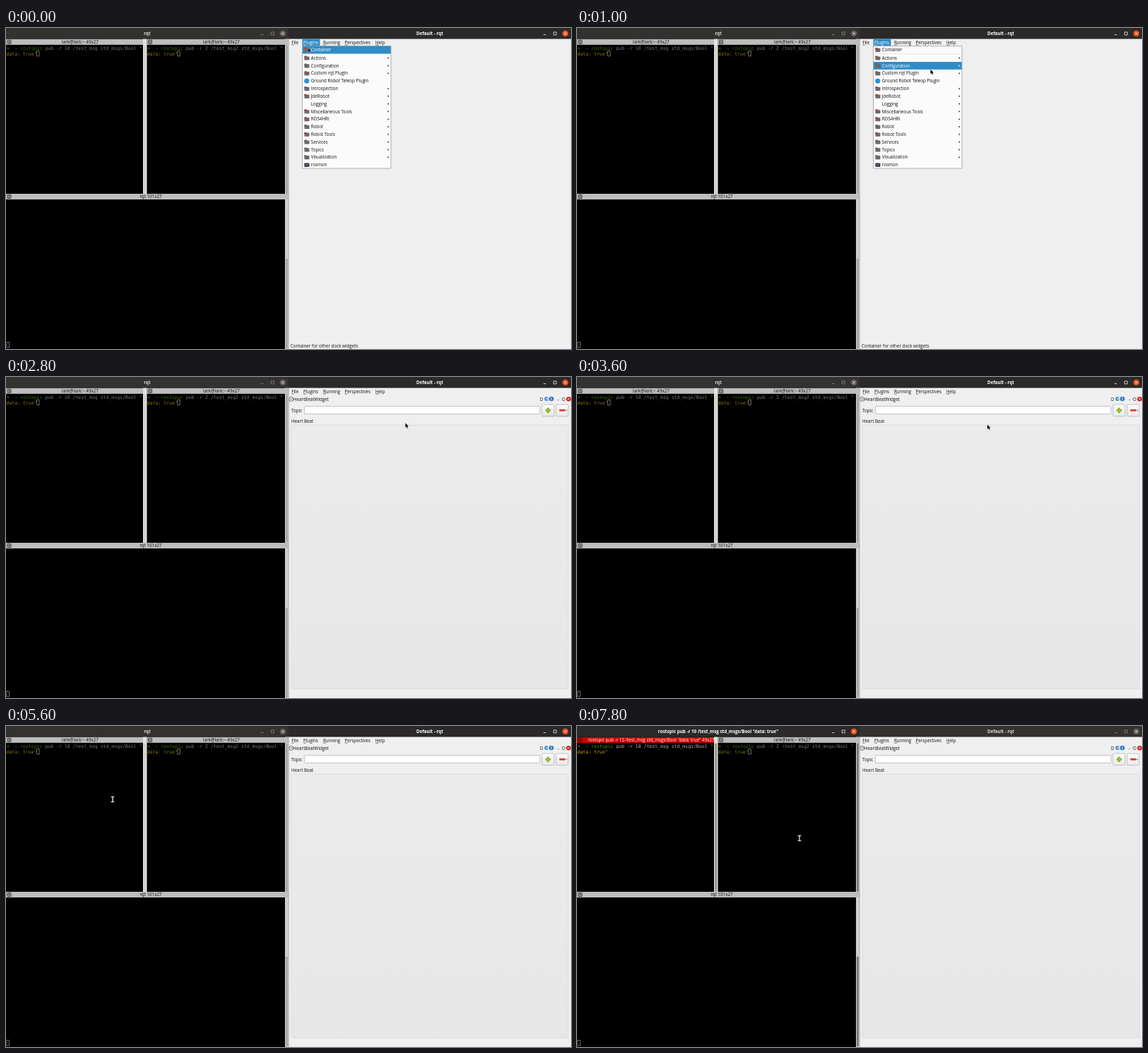
Animation of 800 by 455 pixels, one loop 8 s. Source, as an HTML page with a canvas:

```html
<!DOCTYPE html>
<html lang="en">
<head>
<meta charset="utf-8">
<title>rqt plugin demo</title>
<style>
  html, body { margin: 0; width: 100%; height: 100%; overflow: hidden; background: #000; }
  canvas { display: block; width: 800px; height: 455px; }
</style>
</head>
<body>
<canvas id="stage" width="800" height="455"></canvas>
<script>
const ctx = document.getElementById('stage').getContext('2d');
const LOOP = 8000, STEP = 200;
const MENU_CLOSE = 2600, WIDGET_OPEN = 2800, FOCUS = 5800, RUN = 6800;
const SANS = '6.25px "Open Sans", "Noto Sans", sans-serif';
const MONO = '6.5px "DejaVu Sans Mono", monospace';
const CELL = 3.92, BLUE = '#308cc6', ORANGE = '#e95420';
const HOST = 'lark@lark:~';
const COMMANDS = ['-r 10 /test_msg', '-r 2 /test_msg2'];

// time, x, y of the pointer
const POINTER = [[0, 427.5, 28], [200, 432, 30], [1000, 500.5, 58.7], [1200, 503, 60.5],
  [2000, 549.5, 62.5], [2400, 550, 63], [3200, 581, 67.5], [3800, 581, 67.5], [5200, 151, 104],
  [6400, 151, 104], [7200, 151, 104], [7800, 315, 159]];

// label, icon: f folder, r folder with red, b blue disc, m monitor
const ITEMS = [['Container', 'r'], ['Actions', 'r'], ['Configuration', 'f'], ['Custom rqt Plugin', 'r'],
  ['Ground Robot Teleop Plugin', 'b'], ['Introspection', 'f'], ['JdeRobot', 'r'], ['Logging', ''],
  ['Miscellaneous Tools', 'r'], ['ROS4HRI', 'r'], ['Robot', 'f'], ['Robot Tools', 'r'],
  ['Services', 'f'], ['Topics', 'f'], ['Visualization', 'f'], ['rosmon', 'm']];
const CUSTOM = 3;

function rect(x, y, w, h, fill) {
  ctx.fillStyle = fill;
  ctx.fillRect(x, y, w, h);
}

function box(x, y, w, h, fill, stroke, radius = 0) {
  ctx.beginPath();
  ctx.roundRect(x, y, w, h, radius);
  if (fill) { ctx.fillStyle = fill; ctx.fill(); }
  if (stroke) { ctx.strokeStyle = stroke; ctx.lineWidth = 0.8; ctx.stroke(); }
}

function disc(x, y, r, fill, stroke) {
  box(x - r, y - r, 2 * r, 2 * r, fill, stroke, r);
}

function lines(points, color, width = 0.8) {
  ctx.beginPath();
  for (const [x1, y1, x2, y2] of points) { ctx.moveTo(x1, y1); ctx.lineTo(x2, y2); }
  ctx.strokeStyle = color;
  ctx.lineWidth = width;
  ctx.stroke();
}

function polygon(points, fill, stroke) {
  ctx.beginPath();
  points.forEach(([x, y]) => ctx.lineTo(x, y));
  ctx.closePath();
  if (stroke) { ctx.strokeStyle = stroke; ctx.lineWidth = 1; ctx.stroke(); }
  ctx.fillStyle = fill;
  ctx.fill();
}

// y is the middle of the capitals
function text(str, x, y, color = '#111', { align = 'left', font = SANS } = {}) {
  ctx.font = font;
  ctx.textAlign = align;
  ctx.fillStyle = color;
  ctx.fillText(str, x, y + 2.2);
}

function cross(x, y, r, color) {
  lines([[x - r, y - r, x + r, y + r], [x + r, y - r, x - r, y + r]], color);
}

function titleBar(x, title, active) {
  const ink = active ? '#f2f2f2' : '#8b8986';
  rect(x, 0, 400, 15.5, active ? '#2b2929' : '#343231');
  text(title, x + 200, 8, active ? '#fff' : '#dcdad7', { align: 'center', font: 'bold ' + SANS });
  lines([[x + 361, 9.5, x + 364.5, 9.5]], ink);
  box(x + 375.3, 5.8, 4, 4, null, ink);
  disc(x + 392, 7.8, 4.3, active ? ORANGE : '#63605e');
  cross(x + 392, 7.8, 1.5, '#fff');
}

function splitIcon(x, y, color) {
  box(x, y, 5, 5, null, color);
  lines([[x + 2.5, y, x + 2.5, y + 5], [x, y + 2.5, x + 5, y + 2.5]], color, 0.6);
}

function paneBar(x, y, w, title, center, focused) {
  rect(x, y, w, 8, focused ? '#cf0000' : '#bdbdbd');
  splitIcon(x + 2, y + 1.5, focused ? '#4a0000' : '#222');
  text(title, center, y + 4.1, focused ? '#fff' : '#111', { align: 'center' });
}

function command(x, args, focused) {
  const palette = focused
    ? { arrow: '#4fae16', dir: '#1b9c9e', name: '#4e9a06', arg: '#b0b0b0', str: '#c4a916' }
    : { arrow: '#3d7d16', dir: '#2b6c6d', name: '#3b6d10', arg: '#777', str: '#887713' };
  const put = (str, col, row, color) =>
    text(str, x + col * CELL, 28.3 + row * 8, color, { font: MONO });
  put('➜', 0, 0, palette.arrow);
  put('~', 3, 0, palette.dir);
  put('rostopic', 5, 0, palette.name);
  put(`pub ${args} std_msgs/Bool`, 14, 0, palette.arg);
  put('"', 48, 0, palette.str);
  put('data: true"', 0, 1, palette.str);
}

function terminals(t) {
  const focused = t >= FOCUS, running = t >= RUN;
  const job = `rostopic pub ${COMMANDS[0]} std_msgs/Bool "data: true"`;
  const shell = running ? job : HOST;
  const thumb = focused ? '#7d7b79' : '#a9a8a7';

  rect(0, 15, 400, 440, '#000');
  titleBar(0, focused ? shell : 'rqt', focused);
  rect(194, 15.5, 5.5, 220, '#e4e3e2');
  rect(195.3, 24.5, 2.6, 210, focused ? '#8b8a88' : '#d0cfce');
  rect(395, 15.5, 5, 439.5, '#cfcecd');
  rect(396, 24.5, 3, 210, thumb);
  rect(396, 327, 3, 127, thumb);

  paneBar(0, 15.8, 194, `${shell} 49x27`, 105, focused);
  paneBar(199.5, 15.8, 200.5, `${HOST} 49x27`, 305, false);
  paneBar(0, 235, 400, 'rqt 101x27', 205, false);

  command(0.5, COMMANDS[0], focused);
  command(199.8, COMMANDS[1], false);
  if (!focused) box(43.4, 32.4, 3.6, 7.4, null, '#8a8a8a');
  else if (!running) rect(43, 32, 4, 8, '#b5b5b5');
  box(242.7, 32.4, 3.6, 7.4, null, '#8a8a8a');
  box(0.9, 445.4, 3.6, 7.6, null, '#8a8a8a');
}

function clockIcon(x, y) {
  disc(x, y, 3, '#f4f4f4', '#444');
  lines([[x - 1.5, y - 1, x, y + 0.7], [x, y + 0.7, x + 1.7, y - 1.3]], '#444', 0.7);
}

function itemIcon(kind, y) {
  if (kind === 'b') {
    disc(425.8, y, 3.6, '#2d93d1');
  } else if (kind === 'm') {
    box(422.4, y - 2.7, 7, 5.4, '#2c3244', null, 0.6);
    lines([[423.5, y, 426, y], [426, y, 428, y - 1]], '#c8cede', 0.6);
  } else if (kind) {
    box(422.5, y - 3, 3.5, 3, '#57555a', null, 0.5);
    box(422.5, y - 2.2, 7, 5.2, '#6a686d', null, 0.7);
    if (kind === 'r') rect(422.7, y - 2.3, 3.4, 1.6, '#c44535');
  }
}

function menuBar(open) {
  const entries = [['File', 404.3], ['Plugins', 421], ['Running', 449], ['Perspectives', 479.5], ['Help', 523]];
  if (open) rect(419.5, 15.5, 25, 10, BLUE);
  for (const [label, x] of entries) {
    const color = open && label === 'Plugins' ? '#fff' : '#111';
    text(label, x, 20.8, color);
    lines([[x + 0.3, 24.1, x + ctx.measureText(label[0]).width, 24.1]], color, 0.6);
  }
}

const itemY = i => i ? 42.6 + (i - 1) * 10.82 : 31;

function pluginMenu(pointer) {
  const inSubmenu = pointer.x > 545.5;
  const hovered = inSubmenu ? CUSTOM
    : Math.max(0, ITEMS.findIndex((_, i) => Math.abs(pointer.y - itemY(i)) <= 5.8));

  box(419.5, 25.6, 125.5, 173.4, '#fbfbfb', '#9d9d9d');
  lines([[421, 36.8, 544, 36.8]], '#d0d0d0', 0.6);
  rect(420, itemY(hovered) - 5.4, 124.8, 10.8, BLUE);
  ITEMS.forEach(([label, icon], i) => {
    const y = itemY(i), color = i === hovered ? '#fff' : '#111';
    itemIcon(icon, y);
    text(label, 431.7, y, color);
    if (i && icon !== 'b' && icon !== 'm')
      polygon([[540.6, y - 1.5], [542.3, y], [540.6, y + 1.5]], color);
  });

  if (hovered === CUSTOM) {
    box(545.6, 58.7, 98.6, 10.8, inSubmenu ? BLUE : '#fbfbfb', '#8d8d8d');
    clockIcon(551, 64.2);
    text('Heart Beat Checker', 556.7, 64.2, inSubmenu ? '#fff' : '#111');
  }
  const status = inSubmenu ? 'Great user interface to provide real value.'
    : hovered === CUSTOM ? 'Plugins related to ROS topics'
    : 'Container for other dock widgets';
  text(status, 402.7, 451);
}

function toolButton(x) {
  const shade = ctx.createLinearGradient(0, 39, 0, 56);
  shade.addColorStop(0, '#fcfcfc');
  shade.addColorStop(1, '#e9e9e9');
  box(x, 39, 17, 16.6, shade, '#b4b4b4', 1);
}

function heartBeatWidget() {
  clockIcon(403.6, 31.4);
  text('HeartBeatWidget', 407, 31.5);
  text('D', 756, 31.5);
  disc(765.3, 31, 3, '#4f96d6');
  lines([[765.3, 31, 768, 29.4], [765.3, 31, 768.3, 31.6]], '#efefef', 1);
  disc(772.2, 31, 3.3, '#2f78c4');
  lines([[772.2, 28.8, 772.2, 33]], '#fff', 0.8);
  text('-', 781, 31.5);
  text('O', 787, 31.5);
  disc(796.6, 31.2, 3.3, '#d61e1e');
  cross(796.6, 31.2, 1.3, '#fff');

  text('Topic', 404, 47.5);
  box(422.4, 41.6, 333.6, 10.8, '#fff', '#b4b4b4', 1);
  toolButton(759);
  lines([[764, 47.3, 771.2, 47.3], [767.6, 43.7, 767.6, 50.9]], '#6f9d16', 3);
  lines([[764.6, 47.3, 770.6, 47.3], [767.6, 44.3, 767.6, 50.3]], '#9cc936', 1.7);
  toolButton(779);
  rect(783.5, 45.8, 8.2, 2.8, '#d9372c');
  polygon([[792.4, 46.8], [794.6, 46.8], [793.5, 48.2]], '#444');

  text('Heart Beat', 404, 62.6);
  const shade = ctx.createLinearGradient(0, 68, 0, 442);
  shade.addColorStop(0, '#ebebeb');
  shade.addColorStop(1, '#e7e7e7');
  box(404.2, 68, 391.8, 373.8, shade, '#d9d9d9', 1);
}

function pointerAt(t) {
  const i = Math.max(1, POINTER.findIndex(key => key[0] > t));
  const next = t >= POINTER.at(-1)[0] ? POINTER.length - 1 : i;
  const [t0, x0, y0] = POINTER[next - 1], [t1, x1, y1] = POINTER[next];
  const u = Math.min(1, (t - t0) / (t1 - t0));
  return { x: x0 + (x1 - x0) * u, y: y0 + (y1 - y0) * u, hidden: t >= 6400 && t < 7400 };
}

function drawPointer({ x, y, hidden }) {
  if (hidden) return;
  if (x < 395) {
    const beam = [[x - 2.2, y - 3.5, x + 2.2, y - 3.5], [x, y - 3.5, x, y + 3.5], [x - 2.2, y + 3.5, x + 2.2, y + 3.5]];
    lines(beam, '#555', 2);
    lines(beam, '#e6e6e6', 1);
  } else {
    const shape = [[0, 0], [0, 6.4], [1.5, 5.1], [2.6, 7.4], [3.7, 6.9], [2.7, 4.7], [4.5, 4.5]];
    polygon(shape.map(([dx, dy]) => [x + dx, y + dy]), '#111', '#e8e8e8');
  }
}

function draw(t) {
  const pointer = pointerAt(t), menuOpen = t < MENU_CLOSE;
  rect(400, 0, 400, 455, '#efefef');
  terminals(t);
  titleBar(400, 'Default - rqt', t < FOCUS);
  menuBar(menuOpen);
  if (menuOpen) pluginMenu(pointer);
  if (t >= WIDGET_OPEN) heartBeatWidget();
  lines([[400.3, 15, 400.3, 455]], '#8f8e8d', 0.6);
  drawPointer(pointer);
}

function tick() {
  const t = performance.now() % LOOP;
  draw(Math.floor(t / STEP) * STEP);
  requestAnimationFrame(tick);
}
tick();
</script>
</body>
</html>
```
